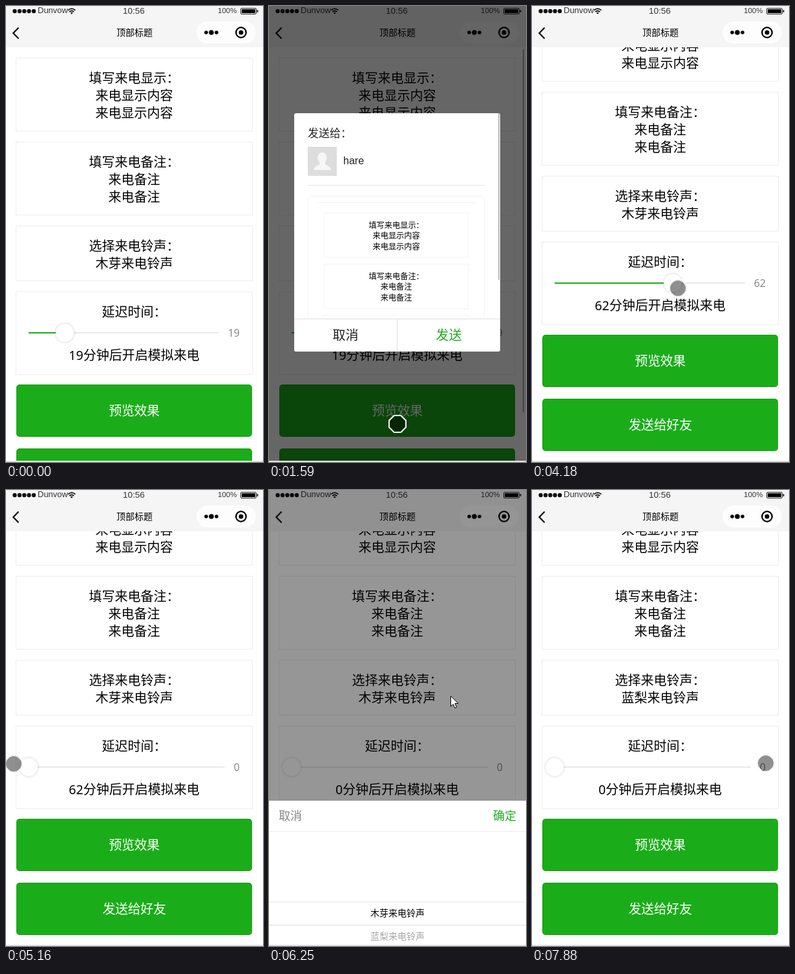
Recreate the animation shown at these times as an HTML page. Size 398 by 706 pixels, loop 8 s.

```html
<!DOCTYPE html>
<html lang="zh-CN">
<head>
<meta charset="utf-8">
<title>顶部标题</title>
<style>
@property --scroll { syntax: '<number>'; inherits: true; initial-value: 0 }
@property --value { syntax: '<integer>'; inherits: true; initial-value: 19 }
@property --minutes { syntax: '<integer>'; inherits: true; initial-value: 19 }

html, body { margin: 0; width: 100%; height: 100%; overflow: hidden; background: #fff }
* { box-sizing: border-box }
.stage {
  position: relative; width: 398px; height: 706px; overflow: hidden; background: #fff; color: #000;
  font: 20px/27px 'Noto Sans', 'Noto Sans CJK SC', 'Noto Sans CJK JP', sans-serif;
  white-space: nowrap;
  --green: #1aad19;
  animation: scroll 8s infinite, value 8s linear infinite, minutes 8s step-end infinite;
}
.stage div, .stage svg { position: absolute }
.stage svg { overflow: visible }

/* page */
.view { inset: 64px 0 0; overflow: hidden }
.page { top: -64px; left: 0; width: 398px; transform: translateY(calc(var(--scroll) * -1px)) }
.list { left: 0; top: 0; width: 398px; height: 780px }
.card { left: 15px; width: 367px; padding-top: 17px; border: 1px solid #eee; text-align: center }
.card p { margin: 0; height: 27px; position: relative }
.btn {
  left: 16px; width: 365px; height: 81px; border-radius: 5px; box-shadow: inset 0 0 0 1px rgba(0, 0, 0, .1);
  background: var(--green); color: #fff; font-weight: 500; letter-spacing: -.4px; line-height: 82px; text-align: center;
}
.stage .slider { position: relative; display: flex; align-items: center; height: 40px; margin: 0 19px; top: -1px }
.stage .track { position: relative; flex: 1; height: 2px; border-radius: 2px; background: #e9e9e9 }
.fill { left: 0; top: 0; height: 2px; width: calc(var(--value) * 1%); background: var(--green) }
.knob {
  left: calc(var(--value) * 1%); top: -13px; width: 28px; height: 28px; margin-left: -14px;
  border-radius: 50%; background: #fff; box-shadow: 0 0 4px rgba(0, 0, 0, .2);
}
.num { margin-left: 14px; font-size: 16px; color: #888 }
.num::before { counter-reset: n var(--value); content: counter(n) }
.delay::before { counter-reset: n var(--minutes); content: counter(n); font-size: 19.5px }
.old, .new { position: absolute; left: 0; right: 0 }
.old { animation: old 8s step-end infinite }
.new { opacity: 0; animation: new 8s step-end infinite }

/* header */
.head { inset: 0 0 auto; height: 64px; background: #f5f5f5 }
.head span { position: absolute; line-height: 16px; color: #333; font-family: 'Liberation Sans', Arial, sans-serif }
.head .title { left: 0; right: 0; top: 33px; text-align: center; font: 14px/16px 'Noto Sans', 'Noto Sans CJK SC', 'Noto Sans CJK JP', sans-serif; color: #000 }

.bar { left: 392.5px; top: 67px; width: 2.5px; height: 562px; background: #aaa; transform: translateY(calc(var(--scroll) * .87px)); animation: bar 8s step-end infinite }
.mask { inset: 0; background: #000; opacity: 0; animation: mask 8s infinite }
.edge { left: 0; right: 0; bottom: 0; height: 2px; background: #e2e2e2 }

/* share dialog */
.modal { left: 39px; top: 166px; width: 319px; height: 369px; border-radius: 3px; background: #fff; overflow: hidden; opacity: 0; animation: modal 8s infinite }
.body { inset: 0 0 51px; overflow: hidden }
.to { left: 21px; top: 17px; font-size: 17px; color: #222 }
.avatar { left: 21px; top: 52px }
.nick { left: 76px; top: 60px; font: 16px/27px 'Liberation Sans', Arial, sans-serif; color: #222 }
.rule { left: 21px; top: 111px; width: 274px; height: 1px; background: #e5e5e5 }
.shot { left: 21px; top: 128px; width: 274px; height: 300px; border: 1px solid #f2f2f2; border-radius: 5px }
.shot-top { left: 37px; top: 138px; width: 244px; height: 1px; background: #f2f2f2 }
.mini { left: 37px; top: 105px; transform: scale(.61); transform-origin: 0 0 }
.modal-bar { right: 1px; top: 0; width: 2.5px; height: 258px; background: #bbb; animation: bar 8s step-end infinite }
.foot { left: 0; right: 0; bottom: 0; height: 51px; border-top: 1px solid #e0e0e0; line-height: 49px; text-align: center }
.cancel { left: 0; top: 0; width: 160px; height: 50px; border-right: 1px solid #e0e0e0; color: #222; animation: press 8s step-end infinite }
.send { left: 160px; top: 0; width: 159px; color: var(--green) }

/* ringtone picker */
.sheet { left: 0; right: 0; top: 406px; height: 300px; background: #fff; transform: translateY(300px); animation: sheet 8s infinite }
.sheet-head { inset: 0 0 auto; height: 48px; border-bottom: 1px solid #e5e5e5; font-size: 18px; line-height: 46px; padding: 0 15px; display: flex; justify-content: space-between; color: #888 }
.sheet-head b { font-weight: 400; color: var(--green) }
.wheel { inset: 48px 0 0; overflow: hidden }
.rows { left: 0; right: 0; top: 108px; font-size: 14px; line-height: 36px; text-align: center; animation: rows 8s infinite }
.fade { left: 0; right: 0; height: 109px }
.fade.up { top: 0; border-bottom: 1px solid #e5e5e5; background: linear-gradient(rgba(255, 255, 255, .95), rgba(255, 255, 255, .6)) }
.fade.down { top: 144px; border-top: 1px solid #e5e5e5; background: linear-gradient(rgba(255, 255, 255, .6), rgba(255, 255, 255, .95)) }

/* pointer */
.pointer { left: 0; top: 0; animation: move 8s linear infinite }
.touch { animation: touch 8s step-end infinite }
.arrow { opacity: 0; animation: arrow 8s step-end infinite }

@keyframes scroll {
  0%, 4.875% { --scroll: 0; animation-timing-function: ease-out }
  10.125% { --scroll: 76; animation-timing-function: linear }
  10.7% { --scroll: 77; animation-timing-function: step-end }
  19.25% { --scroll: 0; animation-timing-function: step-end }
  21%, 100% { --scroll: 77 }
}
@keyframes value {
  0%, 42.5% { --value: 19 }
  47%, 47.625% { --value: 48 }
  49%, 54.625% { --value: 62 }
  63.4%, 100% { --value: 0 }
}
@keyframes minutes { 0% { --minutes: 19 } 51.375% { --minutes: 62 } 66.125%, 100% { --minutes: 0 } }
@keyframes old { 0% { opacity: 1 } 97%, 100% { opacity: 0 } }
@keyframes new { 0% { opacity: 0 } 97%, 100% { opacity: 1 } }
@keyframes bar { 0% { opacity: 0 } 4.9% { opacity: 1 } 16% { opacity: 0 } 19.25% { opacity: 1 } 21%, 100% { opacity: 0 } }
@keyframes mask {
  0%, 19.25% { opacity: 0 }
  19.8%, 34.25% { opacity: .6 }
  35.25% { opacity: 0 }
  77% { opacity: 0; animation-timing-function: cubic-bezier(.215, .61, .355, 1) }
  80.2%, 96.875% { opacity: .55 }
  98.4%, 100% { opacity: 0 }
}
@keyframes modal { 0%, 19.25% { opacity: 0 } 19.8%, 34.25% { opacity: 1 } 35.25%, 100% { opacity: 0 } }
@keyframes press { 0% { background: #fff } 32.5% { background: #eee } 35.25%, 100% { background: #fff } }
@keyframes sheet {
  0%, 77% { transform: translateY(300px); animation-timing-function: cubic-bezier(.215, .61, .355, 1) }
  80.2%, 96.875% { transform: translateY(0) }
  98.4%, 100% { transform: translateY(300px) }
}
@keyframes rows { 0%, 85.375% { transform: none } 89.5%, 100% { transform: translateY(-36px) } }
@keyframes touch { 0% { opacity: 1 } 21% { opacity: 0 } 34.75% { opacity: 1 } 77% { opacity: 0 } 97.5%, 100% { opacity: 1 } }
@keyframes arrow { 0% { opacity: 0 } 21% { opacity: 1 } 34.75% { opacity: 0 } 77% { opacity: 1 } 97.5%, 100% { opacity: 0 } }
@keyframes move {
  0%, 4.875% { transform: translate(206px, 730px) }
  7% { transform: translate(206px, 600px) }
  10.125% { transform: translate(205px, 592px) }
  13.875%, 15.125% { transform: translate(200px, 625px) }
  16.625%, 23.75% { transform: translate(199px, 647px) }
  25.25% { transform: translate(210px, 668px) }
  27% { transform: translate(345px, 420px) }
  28.25% { transform: translate(290px, 306px) }
  30.25%, 37.375% { transform: translate(139px, 509px) }
  39.75% { transform: translate(106px, 461px) }
  41.25% { transform: translate(86px, 431px) }
  42.5% { transform: translate(91px, 431px) }
  47%, 47.625% { transform: translate(177px, 437px) }
  49%, 51.375% { transform: translate(218px, 437px) }
  52.25%, 54.625% { transform: translate(226px, 437px) }
  64.5%, 66.125% { transform: translate(12px, 424px) }
  67.25%, 70.125% { transform: translate(19px, 417px) }
  72.25%, 80% { transform: translate(281px, 319px) }
  83.625%, 85.375% { transform: translate(240px, 600px) }
  88.75%, 90.6% { transform: translate(238px, 562px) }
  93.1% { transform: translate(366px, 400px) }
  94.5%, 100% { transform: translate(362px, 423px) }
}
</style>
</head>
<body>
<div class="stage">
  <div class="view"><div class="page"><div class="list">
    <div class="card" style="top:80px;height:114px"><p>填写来电显示：</p><p>来电显示内容</p><p>来电显示内容</p></div>
    <div class="card" style="top:210px;height:114px"><p>填写来电备注：</p><p>来电备注</p><p>来电备注</p></div>
    <div class="card" style="top:340px;height:86px"><p>选择来电铃声：</p><p><span class="old">木芽来电铃声</span><span class="new">蓝梨来电铃声</span></p></div>
    <div class="card" style="top:442px;height:129px">
      <p>延迟时间：</p>
      <div class="slider"><div class="track"><div class="fill"></div><div class="knob"></div></div><span class="num"></span></div>
      <p class="delay">分钟后开启模拟来电</p>
    </div>
    <div class="btn" style="top:586px">预览效果</div>
    <div class="btn" style="top:685px">发送给好友</div>
  </div></div></div>

  <div class="head">
    <svg width="398" height="64">
      <g fill="#111"><circle cx="13.5" cy="8" r="3.2"/><circle cx="21" cy="8" r="3.2"/><circle cx="28.3" cy="8" r="3.2"/><circle cx="35.6" cy="8" r="3.2"/><circle cx="43" cy="8" r="3.2"/></g>
      <path d="M96 6.6Q101.7 1.8 107.4 6.6M98.2 9Q101.7 6 105.2 9" fill="none" stroke="#111" stroke-width="1.7"/>
      <path d="M99.7 10.6Q101.7 9 103.7 10.6L101.7 12.8Z" fill="#111"/>
      <rect x="363.5" y="3.5" width="24" height="9" rx="1.5" fill="none" stroke="#222"/>
      <rect x="365" y="5" width="21" height="6"/><rect x="388.5" y="6" width="2" height="4" rx="1" fill="#222"/>
      <path d="M19.5 33.5L11.3 42L19.5 50.5" fill="none" stroke="#111" stroke-width="2.3"/>
      <rect x="295" y="24" width="92" height="34" rx="17" fill="#fff" fill-opacity=".8"/>
      <circle cx="310" cy="41" r="2.8"/><circle cx="318" cy="41" r="3.8"/><circle cx="326" cy="41" r="2.8"/>
      <circle cx="364" cy="41" r="7.8" fill="none" stroke="#000" stroke-width="2.3"/><circle cx="364" cy="41" r="3.5"/>
    </svg>
    <span style="left:49px;top:-1px;font-size:13px">Dunvow</span>
    <span style="left:181px;top:0;font-size:13.5px">10:56</span>
    <span style="left:328px;top:-1px;font-size:11.5px">100%</span>
    <span class="title">顶部标题</span>
  </div>

  <div class="bar"></div>
  <div class="mask"></div>

  <div class="modal">
    <div class="body">
      <div class="to">发送给：</div>
      <svg class="avatar" width="45" height="45"><rect width="45" height="45" fill="#ddd"/><ellipse cx="22.5" cy="17" rx="7" ry="8.5" fill="#f6f6f6"/><path d="M9 36Q9 30 18 27.5V22H27V27.5Q36 30 36 36Z" fill="#f6f6f6"/></svg>
      <div class="nick">hare</div>
      <div class="rule"></div>
      <div class="shot"></div>
      <div class="shot-top"></div>
      <div class="mini"></div>
    </div>
    <div class="modal-bar"></div>
    <div class="foot"><div class="cancel">取消</div><div class="send">发送</div></div>
  </div>

  <div class="sheet">
    <div class="sheet-head"><span>取消</span><b>确定</b></div>
    <div class="wheel">
      <div class="rows">木芽来电铃声<br>蓝梨来电铃声</div>
      <div class="fade up"></div><div class="fade down"></div>
    </div>
  </div>

  <div class="edge"></div>

  <div class="pointer">
    <svg class="touch" width="1" height="1">
      <circle r="12" fill="#000" fill-opacity=".44"/>
      <path d="M-5.3-13H5.3L13-5.3V5.3L5.3 13H-5.3L-13 5.3V-5.3Z" fill="none" stroke="#fff" stroke-width="2"/>
      <circle r="13" fill="none" stroke="#000" stroke-opacity=".35" stroke-width=".8" stroke-dasharray="1 2"/>
    </svg>
    <svg class="arrow" width="1" height="1"><path d="M.5 0V16L4.3 12.5L7 18.5L9.5 17.4L7 11.5H12Z" fill="#fff" stroke="#000"/></svg>
  </div>
</div>
<script>
// The dialog previews the page itself, scaled down.
document.querySelector('.mini').append(document.querySelector('.list').cloneNode(true));
</script>
</body>
</html>
```
